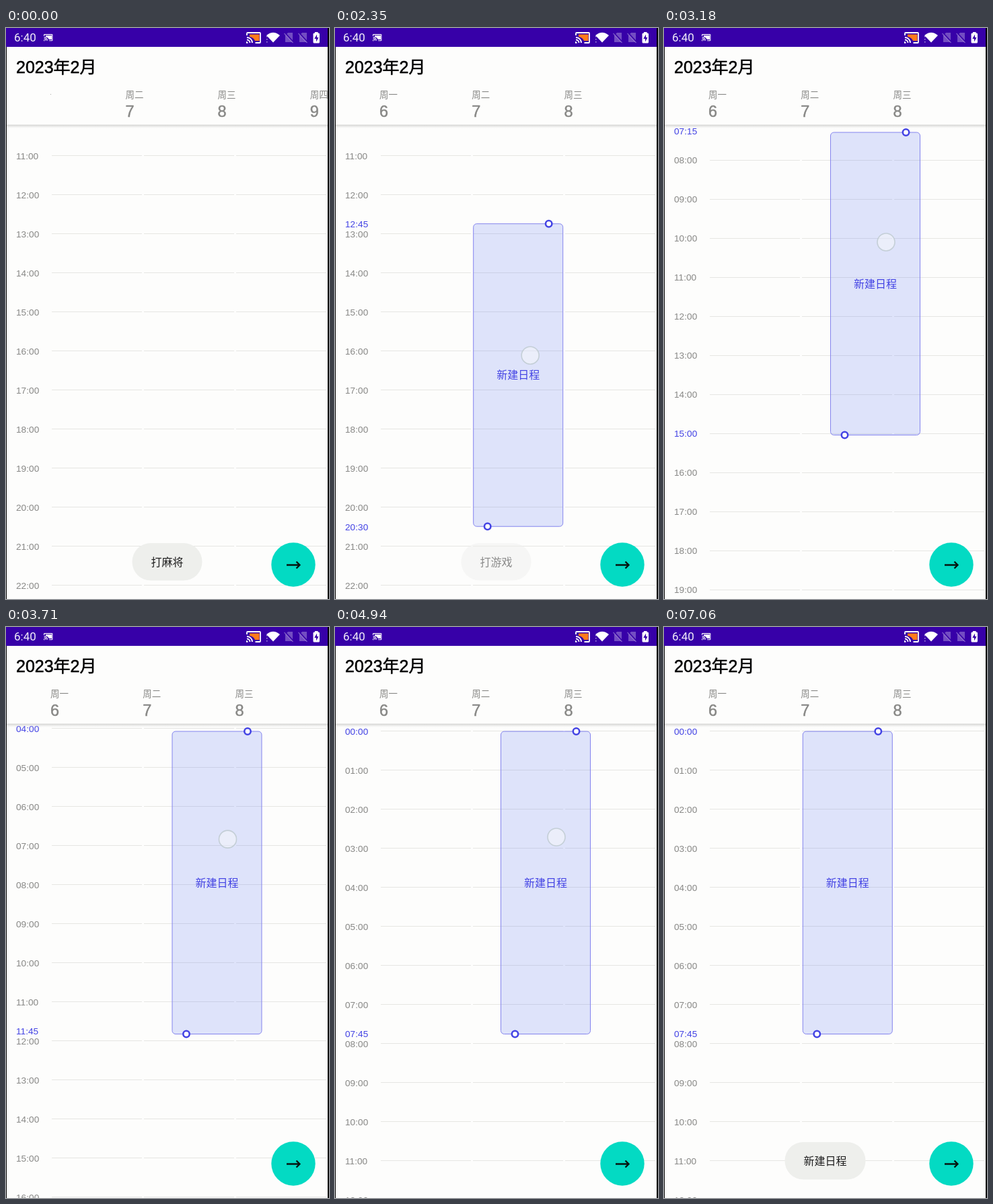
An HTML page with a canvas that plays this animation: 480 by 848 pixels, repeating every 8000 ms.

```html
<!DOCTYPE html>
<html lang="zh-CN">
<head>
<meta charset="utf-8">
<style>
html, body { margin: 0; width: 100%; height: 100%; overflow: hidden; background: #fdfdfc; }
canvas { display: block; width: 480px; height: 848px; }
</style>
</head>
<body>
<canvas id="stage" width="480" height="848"></canvas>
<script>
const LOOP = 8000, HOUR = 58, TOP = 155, MAX_SCROLL = 602.7;
const BG = '#fdfdfc', GRAY = '#888886', BLUE = '#4343e4', PURPLE = '#3700a8';
const FONT = '"Liberation Sans", "Noto Sans CJK SC", "Noto Sans CJK", sans-serif';
const g = document.getElementById('stage').getContext('2d');

const clamp = (v, a = 0, b = 1) => Math.min(b, Math.max(a, v));
const ramp = (t, a, b) => clamp((t - a) / (b - a));
const smooth = p => p * p * (3 - 2 * p);
const easeOut = p => 1 - (1 - p) ** 3;
const mix = (a, b, p) => a + (b - a) * p;
const during = (t, a, b) => t >= a && t < b;

function text(s, x, y, size, color, { align = 'left', bold = 0, font = FONT } = {}) {
  g.font = `${bold ? 500 : 400} ${size}px ${font}`;
  g.textAlign = align;
  g.fillStyle = g.strokeStyle = color;
  g.fillText(s, x, y);
  if (bold) {
    g.lineWidth = bold;
    g.strokeText(s, x, y);
  }
}

function shape(path, fill, stroke, width = 1) {
  const p = new Path2D(path);
  if (fill) { g.fillStyle = fill; g.fill(p); }
  if (stroke) { g.strokeStyle = stroke; g.lineWidth = width; g.stroke(p); }
}

function disc(x, y, r, fill, stroke, width) {
  g.beginPath();
  g.arc(x, y, r, 0, 7);
  if (fill) { g.fillStyle = fill; g.fill(); }
  if (stroke) { g.strokeStyle = stroke; g.lineWidth = width; g.stroke(); }
}

function box(x, y, w, h, r, fill, stroke) {
  g.beginPath();
  g.roundRect(x, y, w, h, r);
  g.fillStyle = fill;
  g.fill();
  if (stroke) { g.strokeStyle = stroke; g.lineWidth = 1; g.stroke(); }
}

// Scroll offset, event rectangle and finger for a moment in the loop
function pose(t) {
  const scroll = clamp((t - 2667) * 0.3514, 0, MAX_SCROLL);
  const yOf = h => 190 + (h - 11) * HOUR + scroll;
  const stretch = smooth(ramp(t, 1115, 2050));
  const drag = smooth(ramp(t, 2335, 2740));
  const release = easeOut(ramp(t, 5350, 5650));
  const height = mix(HOUR, 7.75 * HOUR, stretch);
  const fingerY = mix(487, 318, drag) - 6 * ramp(t, 3180, 4290);

  const x = 205.5 + 42 * drag * (1 - release) - ramp(t, 3200, 4200) * (1 - release)
    + 0.8 * ramp(t, 6410, 6500);
  const y = Math.max(TOP, 291.5 - (487 - fingerY));

  let finger = null;
  if (during(t, 640, 780)) finger = [272, 322];
  else if (during(t, 1060, 2110)) finger = [mix(282, 290, stretch), y + height + 25];
  else if (during(t, 2230, 5350)) {
    finger = [290 + 40 * drag - ramp(t, 3200, 4200), fingerY];
  } else if (during(t, 6410, 6530)) finger = [286, 420];

  return { yOf, x, y, height, finger, visible: t >= 760 };
}

function clock(h) {
  const m = Math.round(h * 60);
  const two = n => String(n).padStart(2, '0');
  return two(Math.floor(m / 60)) + ':' + two(m % 60);
}

function timeLabel(h, y, color) {
  text(clock(h), 15, y + 4.8, 13.7, color);
}

function grid(p) {
  const marks = [];
  if (p.visible) {
    for (const y of [p.y, p.y + p.height]) {
      marks.push(Math.round((y - p.yOf(0)) / HOUR * 4) / 4);
    }
  }
  for (let h = 0; h <= 24; h++) {
    const y = p.yOf(h);
    if (y < 120 || y > 870) continue;
    g.fillStyle = '#e6e6e3';
    for (const x of [68, 205, 342]) g.fillRect(x, Math.round(y) - 1, 134, 1);
    if (!marks.includes(h)) timeLabel(h, y, GRAY);
  }
  for (const h of marks) timeLabel(h, p.yOf(h), BLUE);
}

function eventBox({ x, y, height }) {
  const bottom = y + height;
  box(x, y, 133, height, 5, 'rgba(98,120,240,.2)', '#8484ee');
  text('新建日程', x + 66.5, y + height / 2 + 6, 16, BLUE, { align: 'center' });
  disc(x + 112, y, 4.7, '#fff', BLUE, 2.6);
  disc(x + 21, bottom, 4.7, '#fff', BLUE, 2.6);
}

function header(t) {
  const shift = -26 * (1 - easeOut(ramp(t, 0, 380)));
  text('2023年2月', 15, 67, 25, '#000', { bold: 0.5 });
  g.save();
  g.beginPath();
  g.rect(66, 85, 414, 55);
  g.clip();
  [...'一二三四'].forEach((c, i) => {
    const x = 66 + i * 137.2 + shift;
    text('周' + c, x, 104, 13.5, GRAY);
    text(6 + i, x, 131.5, 23.5, GRAY, { bold: 0.5 });
  });
  g.restore();
  const shade = g.createLinearGradient(0, 143, 0, 149);
  shade.addColorStop(0, 'rgba(190,190,188,.1)');
  shade.addColorStop(0.25, 'rgba(190,190,188,.55)');
  shade.addColorStop(1, 'rgba(220,220,218,0)');
  g.fillStyle = shade;
  g.fillRect(0, 143, 480, 6);
}

function castIcon(x, y, s, fill) {
  g.save();
  g.translate(x, y);
  g.scale(s, s);
  if (fill) shape('M5 3.5H19.5V13H13Q11 8 5 7Z', fill);
  shape('M1 5V2Q1 1 2 1H20Q21 1 21 2V15Q21 16 20 16H13.5M1 8A8 8 0 0 1 9 16M1 11.5A4.5 4.5 0 0 1 5.5 16',
    null, '#fff', 1.8);
  shape('M0 14A2.5 2.5 0 0 1 2.5 16.8H0Z', '#fff');
  g.restore();
}

function statusBar() {
  g.fillStyle = PURPLE;
  g.fillRect(0, 0, 480, 28);
  text('6:40', 12, 20, 17, '#f4f0fa', { font: 'Roboto, sans-serif' });
  castIcon(56, 9, 0.61, '#fff');
  castIcon(357, 6, 1, '#ff7a1a');
  shape('M387 11Q397 2.500 407 11L397 21.500Z', '#fff');
  g.fillStyle = 'rgba(255,255,255,.6)';
  for (const y of [12, 16, 20]) g.fillRect(387, y, 1.5, 1.5);
  for (const x of [414, 435]) {
    shape(`M${x + 5} 7H${x + 12}V21H${x + 1}V11Z`, 'rgba(255,255,255,.3)');
    shape(`M${x} 7L${x + 13} 21`, null, PURPLE, 2.4);
    shape(`M${x - 0.5} 8L${x + 12.5} 22`, null, 'rgba(255,255,255,.35)', 1.2);
  }
  box(456.5, 7.5, 9.5, 15, 1.5, '#fff');
  g.fillRect(459, 6, 4.5, 2);
  shape('M462 9.500L458.300 16H461V20.500L464.500 14H462Z', PURPLE);
}

function toast(label, alpha) {
  if (alpha <= 0) return;
  const w = label.length * 16 + 56;
  g.globalAlpha = alpha;
  box(239.5 - w / 2, 765, w, 55.5, 27.5, '#eeefec');
  text(label, 239.5, 799, 16, '#1e1e1e', { align: 'center' });
  g.globalAlpha = 1;
}

function fab() {
  disc(427, 797, 32.7, '#03dac3');
  shape('M417 797.500H436M431.500 792.500L436.500 797.500L431.500 802.500', null, '#06140f', 2.3);
}

function draw(t) {
  g.fillStyle = BG;
  g.fillRect(0, 0, 480, 848);
  const p = pose(t);

  g.save();
  g.beginPath();
  g.rect(0, 145, 480, 703);
  g.clip();
  grid(p);
  if (p.visible) eventBox(p);
  g.restore();

  header(t);
  fab();
  toast('打麻将', 1 - ramp(t, 100, 600));
  toast('打游戏', Math.min(ramp(t, 120, 620), 1 - ramp(t, 2100, 2600)));
  toast('新建日程', ramp(t, 6540, 7050));
  if (p.finger) disc(...p.finger, 13, 'rgba(250,250,250,.45)', 'rgba(190,202,208,.85)', 1.6);
  statusBar();

  g.fillStyle = '#000';
  g.fillRect(0, 28, 1, 820);
  g.fillRect(478, 0, 2, 848);
}

const start = performance.now();
function tick() {
  draw((performance.now() - start) % LOOP);
  requestAnimationFrame(tick);
}
tick();
</script>
</body>
</html>
```
